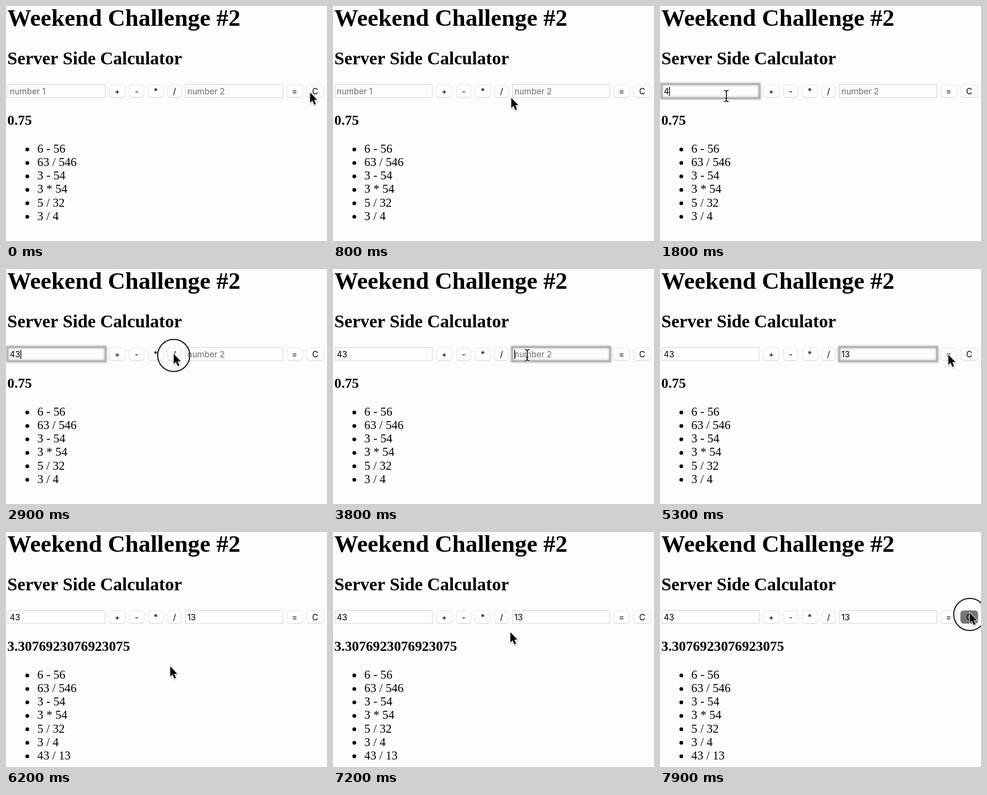
Animation of 600 by 439 pixels, one loop 8000 ms. Source, as an HTML page with a canvas:

```html
<!DOCTYPE html>
<html lang="en">
<head>
<meta charset="utf-8">
<title>Server Side Calculator</title>
<style>
  html, body { margin: 0; width: 100%; height: 100%; overflow: hidden; background: #fefdfe; }
  canvas { display: block; }
</style>
</head>
<body>
<canvas id="stage" width="600" height="439"></canvas>
<script>
const ctx = document.getElementById('stage').getContext('2d');
const SERIF = '"Liberation Serif", serif';
const UI = '15.5px Inter, sans-serif';
const PAGE = '#fefdfe';
const LOOP = 8000, STEP = 100;

const buttons = [['+', 193, 30], ['-', 230.5, 27.5], ['*', 265.5, 29], ['/', 302, 26], ['=', 524.5, 30], ['C', 562, 32]];
const history = ['6 - 56', '63 / 546', '3 - 54', '3 * 54', '5 / 32', '3 / 4'];

// Each field: focus span and [time, value] edits
const fields = [
  { x: 3, hint: 'number 1', focus: [1400, 3000], edits: [[1600, '4'], [1900, '43']] },
  { x: 335, hint: 'number 2', focus: [3600, 5500], edits: [[4200, '1'], [4500, '13']] }
];
const clicks = [1300, 2900, 3500, 5400, 7900];
const presses = { '/': 3000, '=': 5500, C: 7900 };
const RESULT_AT = 5600;

// Pointer stops: time, x, y
const path = [
  [0, 568.5, 161.5], [600, 372, 172], [700, 372, 172], [1100, 124, 168], [2200, 124, 168],
  [2800, 313.5, 158.5], [3000, 313.5, 158.5], [3500, 363, 161], [4600, 363, 161],
  [5200, 539, 160], [5700, 539, 160], [6200, 307, 251], [6600, 245, 200],
  [6900, 245, 200], [7800, 579, 151], [LOOP, 579, 151]
];

function pointerAt(t) {
  const i = path.findIndex(p => p[0] > t);
  const [t0, x0, y0] = path[i - 1], [t1, x1, y1] = path[i];
  const u = (t - t0) / (t1 - t0), e = u * u * (3 - 2 * u);
  return [x0 + (x1 - x0) * e, y0 + (y1 - y0) * e];
}

function text(str, x, y, font, color = '#000', align = 'left') {
  ctx.font = font;
  ctx.fillStyle = color;
  ctx.textAlign = align;
  ctx.fillText(str, x, y);
}

function drawField({ x, hint, focus, edits }, t) {
  const focused = t >= focus[0] && t < focus[1];
  const done = edits.filter(e => e[0] <= t);
  const [last, value] = done.length ? done[done.length - 1] : [focus[0], ''];
  ctx.save();
  if (focused) {
    ctx.shadowColor = '#aaa';
    ctx.shadowBlur = 4;
    ctx.strokeStyle = '#b2b2b2';
    ctx.lineWidth = 3.4;
    ctx.strokeRect(x - .2, 145.8, 183.2, 26.4);
  } else {
    ctx.strokeStyle = '#d2d2d2';
    ctx.lineWidth = 1;
    ctx.strokeRect(x + .5, 146.5, 182, 24.5);
  }
  ctx.restore();
  text(value || hint, x + 4, 165, UI, value ? '#000' : '#6c6c6c');
  if (focused && (t - last) % 1000 < 500) {
    const w = value ? ctx.measureText(value).width : 0;
    ctx.fillStyle = '#000';
    ctx.fillRect(Math.round(x + 4 + w), 151, 1.4, 17);
  }
}

function drawButton([label, x, w], t) {
  const at = presses[label], down = t >= at && t < at + 100;
  const box = (dy, color) => {
    ctx.beginPath();
    ctx.roundRect(x, 147 + dy, w, 23.5, 5);
    ctx.fillStyle = color;
    ctx.fill();
  };
  box(1, '#d0d0d0');
  box(0, down ? '#777' : PAGE);
  ctx.strokeStyle = down ? '#777' : '#e2e2e2';
  ctx.lineWidth = 1;
  ctx.stroke();
  text(label, x + w / 2, 165, UI, '#000', 'center');
}

function drawArrow() {
  ctx.beginPath();
  [[0, 0], [0, 19], [4.2, 15.1], [7.5, 22.8], [10.7, 21.4], [7.4, 13.9], [13, 13.7]].forEach(p => ctx.lineTo(...p));
  ctx.closePath();
  ctx.save();
  ctx.shadowColor = 'rgba(0,0,0,.3)';
  ctx.shadowBlur = 3;
  ctx.shadowOffsetY = 1.5;
  ctx.strokeStyle = '#fff';
  ctx.lineWidth = 2;
  ctx.stroke();
  ctx.restore();
  ctx.fillStyle = '#000';
  ctx.fill();
}

function drawBeam() {
  ctx.beginPath();
  for (const s of [-1, 1]) {
    ctx.moveTo(-4.5, 10.5 * s);
    ctx.quadraticCurveTo(0, 10.5 * s, 0, 7 * s);
    ctx.quadraticCurveTo(0, 10.5 * s, 4.5, 10.5 * s);
  }
  ctx.moveTo(0, -8);
  ctx.lineTo(0, 8);
  ctx.moveTo(-2.5, 4);
  ctx.lineTo(2.5, 4);
  for (const [color, width] of [['#fff', 3.4], ['#111', 1.7]]) {
    ctx.strokeStyle = color;
    ctx.lineWidth = width;
    ctx.stroke();
  }
}

function drawPointer(t) {
  const [x, y] = pointerAt(t);
  const overField = y > 146 && y < 171 && fields.some(f => x > f.x && x < f.x + 183);
  ctx.save();
  ctx.translate(x, y);
  if (clicks.some(c => t >= c && t < c + 200)) {
    ctx.beginPath();
    ctx.arc(0, 3, 30, 0, 2 * Math.PI);
    ctx.strokeStyle = '#111';
    ctx.lineWidth = 2;
    ctx.stroke();
  }
  overField ? drawBeam() : drawArrow();
  ctx.restore();
}

function draw(t) {
  ctx.fillStyle = PAGE;
  ctx.fillRect(0, 0, 600, 439);
  const solved = t >= RESULT_AT;
  text('Weekend Challenge #2', 2.6, 37, 'bold 44.8px ' + SERIF);
  text('Server Side Calculator', 2.6, 109, 'bold 33.6px ' + SERIF);
  text(solved ? '3.3076923076923075' : '0.75', 2.6, 222, 'bold 26.2px ' + SERIF);
  (solved ? [...history, '43 / 13'] : history).forEach((item, i) => {
    const y = 274 + i * 25.15;
    text(item, 58.6, y, '22.4px ' + SERIF);
    ctx.beginPath();
    ctx.arc(39.8, y - 6, 3.5, 0, 2 * Math.PI);
    ctx.fill();
  });
  fields.forEach(f => drawField(f, t));
  buttons.forEach(b => drawButton(b, t));
  drawPointer(t);
}

const start = performance.now();
function tick() {
  const t = (performance.now() - start) % LOOP;
  draw(Math.floor(t / STEP) * STEP);
  requestAnimationFrame(tick);
}
tick();
</script>
</body>
</html>
```
